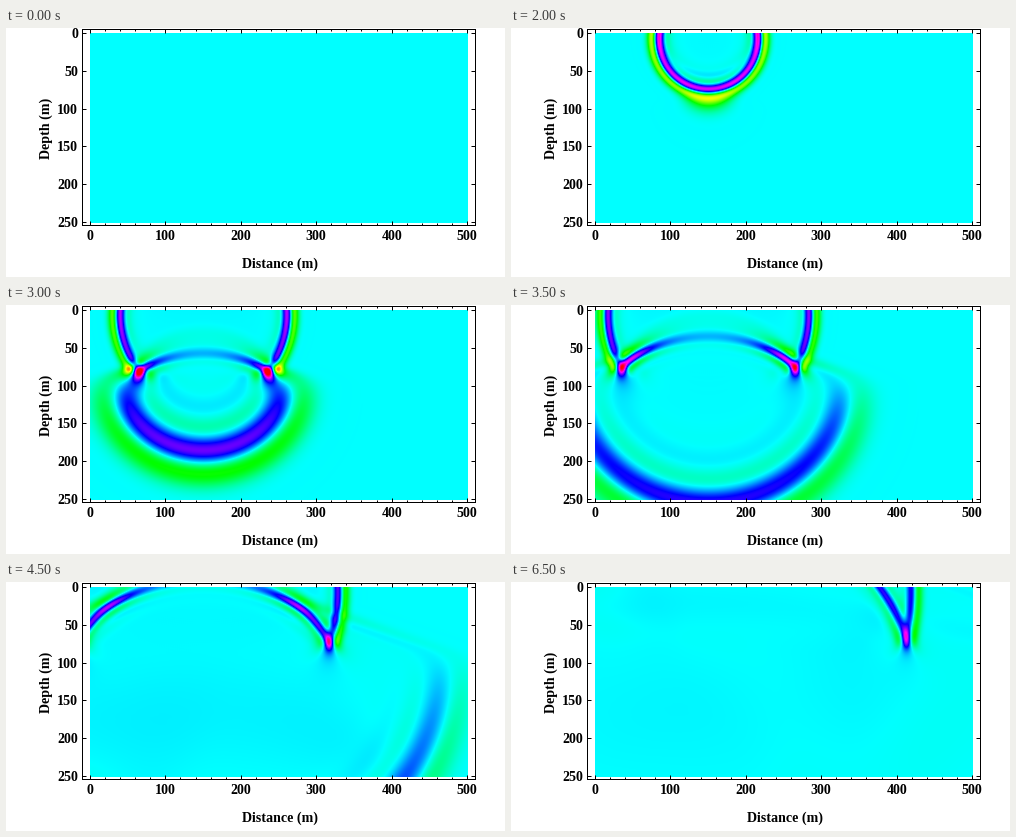
A matplotlib script that plays this animation: 499 px wide and 249 px high, repeating every 7 s.

```python
import numpy as np
import matplotlib.pyplot as plt
from matplotlib.animation import FuncAnimation
from matplotlib.colors import hsv_to_rgb

W, H, DPI = 499, 249, 100
FRAMES, INTERVAL = 14, 500

# Plot area in pixels; the simulation uses one cell per pixel.
LEFT, TOP, NX, NY = 84, 5, 378, 190
PAD, SKY = 100, 130            # absorbing margin, extra room above the surface
RAMP_TOP, RAMP_END = 56, 75    # velocity transition, in cells below the surface
V_UPPER, V_LOWER = 17.0, 52.0  # cells per frame
SUBSTEPS = 90
SRC_X, SRC_Y = 113, 6
SIGMA, DELAY = 0.255, 0.95     # source pulse, in frames
SKEW = 0.25                    # strengthens the leading lobe
GHOST = 0.1                    # weak surface echo
PEAK = 0.37                    # hue offset of the direct wave in frame 4


def pulse(t):
    u = (t - DELAY) / SIGMA
    return (1 - u * u + SKEW * u) * np.exp(-u * u / 2)


def sponge(n):
    i = np.arange(n)
    edge = np.minimum(i, n - 1 - i)
    depth = np.clip(PAD - edge, 0, None)
    return np.exp(-(0.0025 * depth) ** 2)


def simulate():
    """Slow layer over a fast one: one wave field snapshot per frame."""
    rows, cols = SKY + NY + PAD, NX + 2 * PAD
    dt = 1 / SUBSTEPS
    depth = np.arange(rows)[:, None] + 0.5 - SKY
    s = np.clip((depth - RAMP_TOP) / (RAMP_END - RAMP_TOP), 0, 1)
    speed = V_UPPER + (V_LOWER - V_UPPER) * s ** 2
    k = ((speed * dt) ** 2).astype(np.float32)[2:-2]
    damp = np.outer(sponge(rows), sponge(cols)).astype(np.float32)
    p = np.zeros((rows, cols), np.float32)
    old = np.zeros_like(p)
    sx, sy, echo = PAD + SRC_X, SKY + SRC_Y, SKY - 1 - SRC_Y
    a, b = np.float32(4 / 3), np.float32(1 / 12)
    view = np.s_[SKY:SKY + NY, PAD:PAD + NX]

    shots = [p[view].copy()]
    for step in range((FRAMES - 1) * SUBSTEPS):
        mid = p[2:-2, 2:-2]
        lap = p[1:-3, 2:-2] + p[3:-1, 2:-2]
        lap += p[2:-2, 1:-3]
        lap += p[2:-2, 3:-1]
        lap *= a
        far = p[:-4, 2:-2] + p[4:, 2:-2]
        far += p[2:-2, :-4]
        far += p[2:-2, 4:]
        far *= b
        lap -= far
        lap -= 5 * mid
        lap *= k
        lap += 2 * mid
        lap -= old[2:-2, 2:-2]
        old[2:-2, 2:-2] = lap
        force = pulse(step * dt)
        old[sy, sx] += force
        old[echo, sx] += GHOST * force
        old *= damp
        p *= damp
        p, old = old, p
        if (step + 1) % SUBSTEPS == 0:
            shots.append(p[view].copy())
    return np.array(shots)


def colour(field):
    hue = np.clip(0.5 + field, 0, 1)
    one = np.ones_like(hue)
    return hsv_to_rgb(np.stack([hue, one, one], axis=-1))


waves = simulate()
waves *= PEAK / waves[4].max()

plt.rcParams["font.family"] = "Liberation Serif"
plt.rcParams["font.weight"] = "bold"
fig = plt.figure(figsize=(W / DPI, H / DPI), dpi=DPI, facecolor="white")
ax = fig.add_axes([0, 0, 1, 1])
ax.axis("off")
image = ax.imshow(colour(waves[0]), extent=(LEFT, LEFT + NX, TOP + NY, TOP),
                  interpolation="nearest", aspect="auto")
ax.set_xlim(0, W)
ax.set_ylim(H, 0)

# Frame with inward ticks
X0, X1, Y0, Y1 = 76.5, 469.5, 1.5, 197.5
PX = 72 / DPI
SIZE = 14 * PX
line = dict(colors="black", linewidth=PX, snap=False)
ax.hlines([Y0, Y1], X0 - 0.5, X1 + 0.5, **line)
ax.vlines([X0, X1], Y0 - 0.5, Y1 + 0.5, **line)


def to_x(m):
    return LEFT + 0.5 + round(m * (NX - 1) / 500)


def to_y(m):
    return TOP + 0.5 + round(m * (NY - 1) / 250)


for m in range(0, 501, 20):
    size = 4 if m % 100 == 0 else 2
    x = to_x(m)
    ax.vlines(x, Y0, Y0 + size, **line)
    ax.vlines(x, Y1 - size, Y1, **line)
    if m % 100 == 0:
        ax.text(x - 0.5, 212, str(m), ha="center", va="baseline", fontsize=SIZE)

for m in range(0, 251, 50):
    y = to_y(m)
    ax.hlines(y, X0, X0 + 4, **line)
    ax.hlines(y, X1 - 4, X1, **line)
    ax.text(72, y + 4.5, str(m), ha="right", va="baseline", fontsize=SIZE)

ax.text(274, 240, "Distance (m)", ha="center", va="baseline", fontsize=SIZE)
ax.text(40, 100, "Depth (m)", ha="center", va="center", rotation=90, fontsize=SIZE)


def update(i):
    image.set_data(colour(waves[i]))
    return (image,)


anim = FuncAnimation(fig, update, frames=FRAMES, interval=INTERVAL,
                     repeat=True, repeat_delay=0, blit=False)
plt.show()
```
